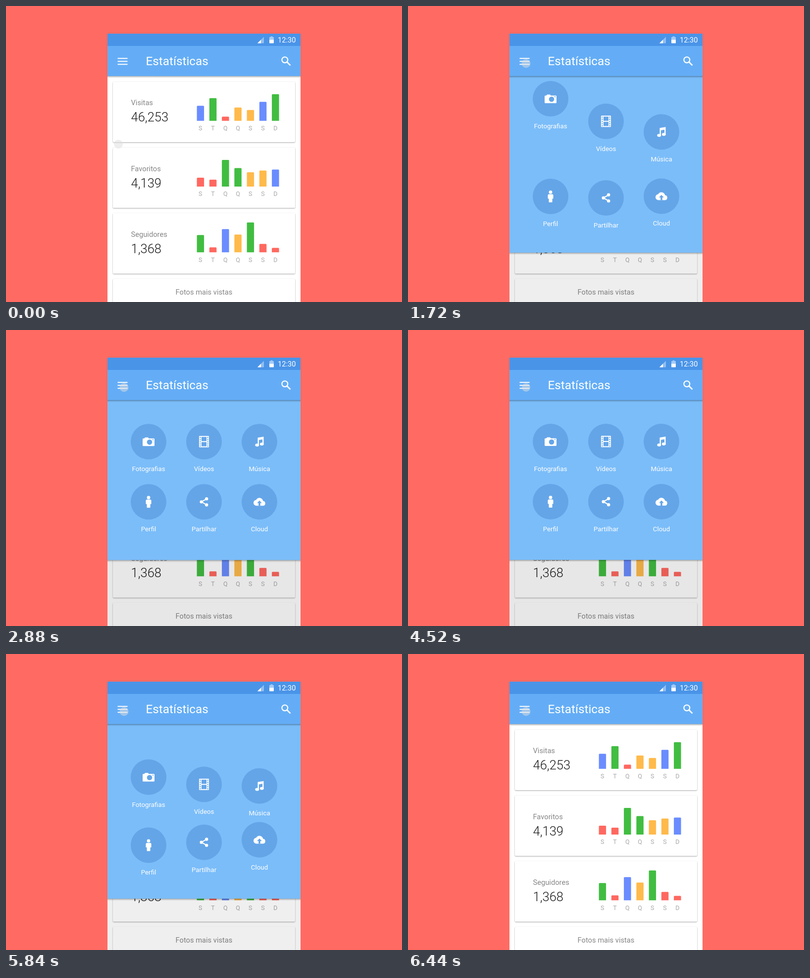
An HTML page that plays this animation: 800 px wide and 600 px high, repeating every 8000 ms.

```html
<!DOCTYPE html>
<html lang="pt">
<head>
<meta charset="utf-8">
<title>Estatísticas</title>
<style>
  html, body { margin: 0; width: 100%; height: 100%; overflow: hidden; background: #ff6b63; }
  svg { display: block; width: 800px; height: 600px; font-family: Roboto, "Noto Sans", sans-serif; }
  .card { fill: #fff; filter: drop-shadow(0 1px 1.3px rgba(0, 0, 0, .36)); }
  .name { font-size: 14.7px; fill: #868686; }
  .total { font-size: 25.5px; font-weight: 300; fill: #1c1c1c; }
  .day { font-size: 12.5px; fill: #a9a9a9; text-anchor: middle; }
  .label { font-size: 13.3px; fill: #fff; text-anchor: middle; }
  .mid { text-anchor: middle; }
  .white { fill: #fff; }
  .hole { fill: #64a5e8; }
</style>
</head>
<body>
<svg viewBox="0 0 800 600">
  <defs>
    <clipPath id="below"><rect x="205" y="142" width="390" height="458"/></clipPath>
    <linearGradient id="fade" x2="0" y2="1">
      <stop offset="0" stop-color="#000" stop-opacity=".34"/>
      <stop offset=".4" stop-color="#000" stop-opacity=".13"/>
      <stop offset="1" stop-color="#000" stop-opacity="0"/>
    </linearGradient>
    <g id="camera">
      <path class="white" d="M-10.500-6.500h2l1.500-2h6l1.500 2h10a1.500 1.500 0 0 1 1.500 1.500v12.500a1.500 1.500 0 0 1-1.500 1.500h-21a1.500 1.500 0 0 1-1.500-1.500v-12.500a1.500 1.500 0 0 1 1.500-1.500z"/>
      <circle class="hole" cx="2" cy="1" r="5.300"/>
      <circle class="hole" cx="9" cy="-4" r="1.100"/>
    </g>
    <g id="film">
      <rect class="white" x="-10" y="-11.500" width="20" height="23" rx="1"/>
      <path class="hole" d="M-5-9.500h10v8.500h-10zM-5 1h10v8.500h-10z"/>
      <path d="M-7.500-9.500v20M7.500-9.500v20" stroke="#64a5e8" stroke-width="2" stroke-dasharray="2.300 2"/>
    </g>
    <g id="music" class="white">
      <path d="M-3.500-8L8.500-10V5.500H6V-4.500L-1-3.300V7.500H-3.500z"/>
      <ellipse cx="-4.700" cy="7" rx="3.900" ry="3"/>
      <ellipse cx="4.800" cy="5" rx="3.900" ry="3"/>
    </g>
    <g id="person" class="white">
      <circle cy="-8.600" r="3.400"/>
      <path d="M-3.500-4.500h7a2 2 0 0 1 2 2v7h-2v6.500a1 1 0 0 1-1 1h-5a1 1 0 0 1-1-1v-6.500h-2v-7a2 2 0 0 1 2-2z"/>
    </g>
    <g id="share">
      <path d="M5-6L-5 0L5 6" fill="none" stroke="#fff" stroke-width="2.200"/>
      <g class="white"><circle cx="5.200" cy="-6.200" r="3.200"/><circle cx="-5.300" r="3.200"/><circle cx="5.200" cy="6.200" r="3.200"/></g>
    </g>
    <g id="cloud" transform="translate(-12 -12)">
      <path class="white" d="M19.350 10.040A7.490 7.490 0 0 0 12 4C9.110 4 6.600 5.640 5.350 8.040A6 6 0 0 0 0 14a6 6 0 0 0 6 6h13a5 5 0 0 0 .350-9.960z"/>
      <path class="hole" d="M12 9.500l4.800 5h-3v5.500h-3.600v-5.500h-3z"/>
    </g>
  </defs>

  <rect width="800" height="600" fill="#ff6b63"/>
  <rect x="205" y="56" width="390" height="544" fill="#fff"/>
  <g id="cards"></g>
  <rect class="card" x="216" y="553" width="368" height="60" rx="2"/>
  <text class="name mid" x="400" y="585">Fotos mais vistas</text>
  <rect id="dim" x="205" y="142" width="390" height="458" opacity="0"/>

  <g clip-path="url(#below)">
    <g id="panel">
      <rect x="205" y="0" width="390" height="466" fill="#7bbdf9"/>
      <rect x="205" y="466" width="390" height="4.500" fill="url(#fade)"/>
    </g>
    <g id="items"></g>
    <rect x="205" y="142" width="390" height="4.500" fill="url(#fade)"/>
  </g>

  <rect x="205" y="56" width="390" height="26" fill="#4a94e8"/>
  <rect x="205" y="81" width="390" height="61" fill="#64adf6"/>
  <path d="M508 75.500L521 62.500V75.500z" fill="#fff" opacity=".4"/>
  <path class="white" d="M508 75.500L515 68.500V75.500z"/>
  <path d="M534.500 61.500h4v1.500h2.500v6h-9v-6h2.500z" fill="#fff" opacity=".5"/>
  <path class="white" d="M532 68.500h9v6a1 1 0 0 1-1 1h-7a1 1 0 0 1-1-1z"/>
  <text class="white" x="549" y="74" font-size="14.700">12:30</text>
  <path d="M225.500 106.200h20M225.500 112.200h20M225.500 118.200h20" stroke="#fff" stroke-width="2"/>
  <text class="white" x="282.500" y="120" font-size="24.300">Estatísticas</text>
  <g fill="none" stroke="#fff" stroke-width="2.200">
    <circle cx="563.300" cy="109.200" r="5.900"/>
    <path d="M567.600 113.500L574.500 120.400" stroke-width="2.700"/>
  </g>
  <circle id="cursor" r="9" fill="#ddd" fill-opacity=".5"/>
</svg>
<script>
  const LOOP = 8000, STEP = 40, TRAVEL = 324;
  const $ = id => document.getElementById(id);
  const COLORS = { B: '#6a8cff', G: '#41bd41', R: '#ff6860', O: '#ffba4b' };

  const stats = [
    ['Visitas', '46,253', 'BGROOBG', [30.5, 46, 8.5, 27, 22, 38.5, 54]],
    ['Favoritos', '4,139', 'RRGGOOB', [18, 14, 54, 37.5, 29, 32.5, 34.5]],
    ['Seguidores', '1,368', 'GRBOGRR', [35, 10, 47, 36, 60.5, 17, 9]]
  ];

  $('cards').innerHTML = stats.map(([name, total, hues, heights], row) => {
    const bars = heights.map((h, i) => {
      const x = 385.6 + i * 25.25;
      return `<path fill="${COLORS[hues[i]]}" d="M${x} 232.700v${1.5 - h}q0-1.500 1.500-1.500h11.500q1.500 0 1.500 1.500v${h - 1.5}z"/>
        <text class="day" x="${x + 7.2}" y="252">${'STQQSSD'[i]}</text>`;
    }).join('');
    return `<g transform="translate(0 ${row * 133.3})">
      <rect class="card" x="216" y="153.500" width="368" height="122.500" rx="2"/>
      <text class="name" x="252.500" y="201.300">${name}</text>
      <text class="total" x="252.500" y="234.300">${total}</text>${bars}</g>`;
  }).join('');

  // label, icon, start of entry, end of exit
  const items = [
    ['Fotografias', 'camera', 1537, 6080],
    ['Vídeos', 'film', 1470, 6140],
    ['Música', 'music', 1411, 6200],
    ['Perfil', 'person', 1362, 6249],
    ['Partilhar', 'share', 1262, 6315],
    ['Cloud', 'cloud', 1197, 6365]
  ];

  $('items').innerHTML = items.map(([label, icon]) =>
    `<g><circle class="hole" r="36"/><use href="#${icon}"/><text class="label" y="60">${label}</text></g>`
  ).join('');
  const nodes = [...$('items').children];

  const ramp = (t, a, b) => Math.min(1, Math.max(0, (t - a) / (b - a)));
  const smooth = u => u * u * (3 - 2 * u);
  // Remaining distance of an elastic settle: 1 at rest above, 0 in place.
  const elastic = u => u >= 1 ? 0 : 2 ** (-10 * u) * Math.cos(2 * Math.PI * u / .665);
  const away = (t, inA, inB, outA, outB) =>
    t < 3700 ? elastic(ramp(t, inA, inB)) : elastic(ramp(t, outB, outA));
  const tap = (t, at) => 1 - .2 * Math.sin(Math.PI * ramp(t, at, at + 200));

  function draw(t) {
    const lift = away(t, 1118, 2973, 4690, 6440);
    $('panel').setAttribute('transform', `translate(0 ${-TRAVEL * lift})`);
    $('panel').style.display = lift >= 1 ? 'none' : '';
    $('dim').setAttribute('opacity', .094 * (ramp(t, 1150, 1950) - ramp(t, 5560, 6440)));

    const drift = 4 * (1 - smooth(ramp(t, 1240, 1640)) + smooth(ramp(t, 5940, 6260)));
    nodes.forEach((node, i) => {
      const [, , enter, exit] = items[i];
      const x = 288 + i % 3 * 112 + drift;
      const y = (i < 3 ? 226 : 348) - TRAVEL * away(t, enter, 2900, 4860, exit);
      node.setAttribute('transform', `translate(${x} ${y})`);
    });

    const go = smooth(ramp(t, 700, 1080));
    const size = tap(t, 1080) * tap(t, 4500);
    $('cursor').setAttribute('transform',
      `translate(${227 + 11.5 * go} ${280 - 163.5 * go}) scale(${size})`);
  }

  const start = performance.now();
  function tick() {
    const t = (performance.now() - start) % LOOP;
    draw(Math.floor(t / STEP) * STEP);
    requestAnimationFrame(tick);
  }
  tick();
</script>
</body>
</html>
```
